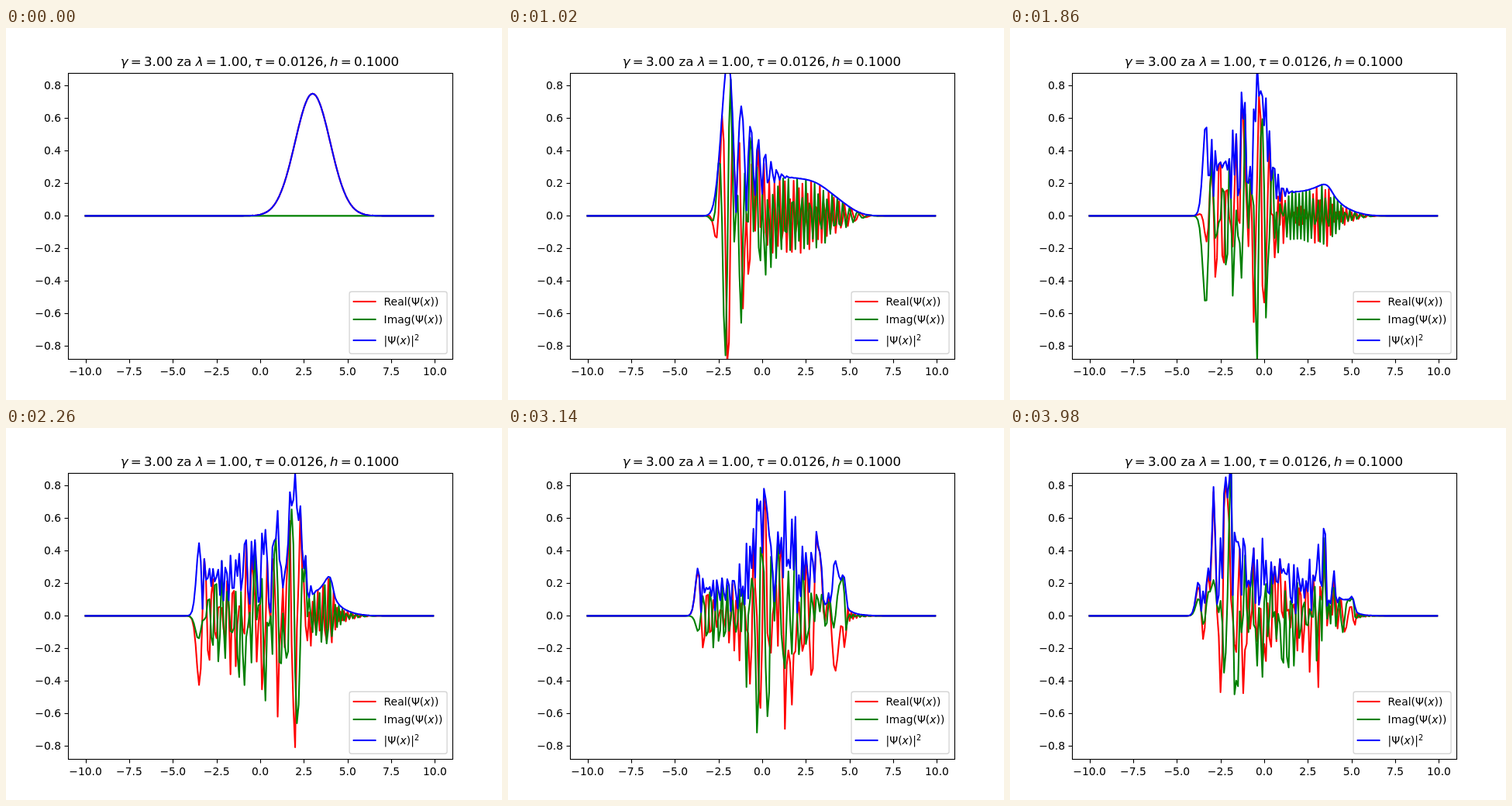
An HTML page with a canvas that plays this animation: 640 by 480 pixels, repeating every 4000 ms.

```html
<!DOCTYPE html>
<html lang="sl">
<head>
<meta charset="utf-8">
<title>Anharmonic oscillator</title>
<style>
html, body { margin: 0; width: 100%; height: 100%; overflow: hidden; background: #fff; }
canvas { display: block; }
</style>
</head>
<body>
<canvas id="plot" width="640" height="480"></canvas>
<script>
const ctx = document.getElementById('plot').getContext('2d');
const FAMILY = '"DejaVu Sans", sans-serif';
const SMALL = 13.89, LARGE = 16.67;
const COLORS = ['#f00', '#008000', '#00f'];
const N = 200, STEPS = 200, STEP_MS = 20;
const h = 0.1, tau = 2 * Math.PI / 500, gamma = 3, lambda = 1;

const gridX = j => -10 + j * h;
const px = x => 328 + x * 496 / 22;
const py = v => 242.4 - v * 210;

// Complex numbers as [re, im].
const ZERO = [0, 0];
const sub = (a, b) => [a[0] - b[0], a[1] - b[1]];
const mul = (a, b) => [a[0] * b[0] - a[1] * b[1], a[0] * b[1] + a[1] * b[0]];
const div = (a, b) => {
  const n = b[0] * b[0] + b[1] * b[1];
  return [(a[0] * b[0] + a[1] * b[1]) / n, (a[1] * b[0] - a[0] * b[1]) / n];
};

// Crank-Nicolson for H = p²/2 + x²/2 + λx⁴ with a five-point second derivative:
// solve (1 + iτH/2) φ = ψ by banded LDLᵀ, then ψ ← 2φ − ψ.
function simulate() {
  const k = tau / 2 / (h * h);
  const near = [0, -2 / 3 * k], far = [0, k / 24];
  const D = [], P = [], Q = [];
  for (let j = 0; j < N; j++) {
    const x = gridX(j);
    const diag = [1, 1.25 * k + tau / 2 * (x * x / 2 + lambda * x ** 4)];
    Q[j] = j > 1 ? div(far, D[j - 2]) : ZERO;
    P[j] = j > 0 ? div(sub(near, mul(far, P[j - 1])), D[j - 1]) : ZERO;
    if (j === 1) P[j] = div(near, D[0]);
    D[j] = sub(diag, mul(Q[j], far));
    if (j > 0) D[j] = sub(D[j], mul(mul(P[j], P[j]), D[j - 1]));
  }
  let psi = Array.from({ length: N }, (_, j) =>
    [Math.PI ** -0.25 * Math.exp(-((gridX(j) - gamma) ** 2) / 2), 0]);
  const states = [];
  for (let n = 0; n < STEPS; n++) {
    states.push([psi.map(c => c[0]), psi.map(c => c[1]), psi.map(c => Math.hypot(...c))]);
    const phi = [];
    for (let j = 0; j < N; j++) {
      phi[j] = sub(psi[j], mul(P[j], phi[j - 1] || ZERO));
      phi[j] = sub(phi[j], mul(Q[j], phi[j - 2] || ZERO));
    }
    for (let j = N - 1; j >= 0; j--) {
      phi[j] = div(phi[j], D[j]);
      if (j + 1 < N) phi[j] = sub(phi[j], mul(P[j + 1], phi[j + 1]));
      if (j + 2 < N) phi[j] = sub(phi[j], mul(Q[j + 2], phi[j + 2]));
    }
    psi = psi.map((c, j) => [2 * phi[j][0] - c[0], 2 * phi[j][1] - c[1]]);
  }
  return states;
}

function line(points, color, width) {
  ctx.beginPath();
  points.forEach(([x, y]) => ctx.lineTo(x, y));
  ctx.strokeStyle = color;
  ctx.lineWidth = width;
  ctx.stroke();
}

function text(s, x, y, size = SMALL, align = 'left', style = '') {
  ctx.font = `${style} ${size}px ${FAMILY}`;
  ctx.textAlign = align;
  ctx.fillStyle = '#000';
  ctx.fillText(s, x, y);
  return ctx.measureText(s).width;
}

// Math text: italic variables, thin gaps around "=" and after commas.
function math(s, x, y, size = SMALL) {
  const gap = 0.195 * size;
  for (const run of s.match(/[γλτhx=,]|[^γλτhx=,]+/g)) {
    if (run === '=') x += gap;
    x += text(run, x, y, size, 'left', /[γλτhx]/.test(run) ? 'italic' : '');
    if (run === '=' || run === ',') x += gap;
  }
  return x;
}

const label = v => v.toFixed(1).replace('-', '\u2212');

function drawAxes() {
  ctx.lineCap = 'butt';
  ctx.strokeStyle = '#000';
  ctx.lineWidth = 1.11;
  ctx.strokeRect(80.5, 58.5, 496, 369);
  for (let k = -4; k <= 4; k++) {
    const x = Math.round(px(k * 2.5)) + 0.5, row = Math.round(py(k / 5));
    line([[x, 427.5], [x, 432.5]], '#000', 1.11);
    line([[75.5, row + 0.5], [80.5, row + 0.5]], '#000', 1.11);
    text(label(k * 2.5), px(k * 2.5), 448, SMALL, 'center');
    text(label(k / 5), 71, row + 5, SMALL, 'right');
  }
  math('γ=3.00 za λ=1.00,τ=0.0126,h=0.1000', 147.7, 49, LARGE);
}

function drawLegend() {
  ctx.beginPath();
  ctx.roundRect(443.1, 340.2, 126, 80, 2.78);
  ctx.fillStyle = 'rgba(255,255,255,.8)';
  ctx.fill();
  ctx.strokeStyle = 'rgba(204,204,204,.8)';
  ctx.lineWidth = 1.39;
  ctx.stroke();
  ctx.lineCap = 'square';
  [353, 376, 403].forEach((y, i) => line([[448.7, y], [476.5, y]], COLORS[i], 2.083));
  math('Real(Ψ(x))', 487.6, 358);
  math('Imag(Ψ(x))', 487.6, 381);
  const end = math('|Ψ(x)|', 487.6, 408);
  text('2', end, 402.7, SMALL * 0.7);
}

const states = simulate();

function draw(now) {
  const state = states[Math.floor(now / STEP_MS) % STEPS];
  ctx.fillStyle = '#fff';
  ctx.fillRect(0, 0, 640, 480);
  ctx.save();
  ctx.beginPath();
  ctx.rect(80, 58, 496, 369);
  ctx.clip();
  ctx.lineJoin = 'round';
  ctx.lineCap = 'square';
  state.forEach((curve, i) => line(curve.map((v, j) => [px(gridX(j)), py(v)]), COLORS[i], 2.083));
  ctx.restore();
  drawAxes();
  drawLegend();
  requestAnimationFrame(draw);
}
draw(0);
</script>
</body>
</html>
```
